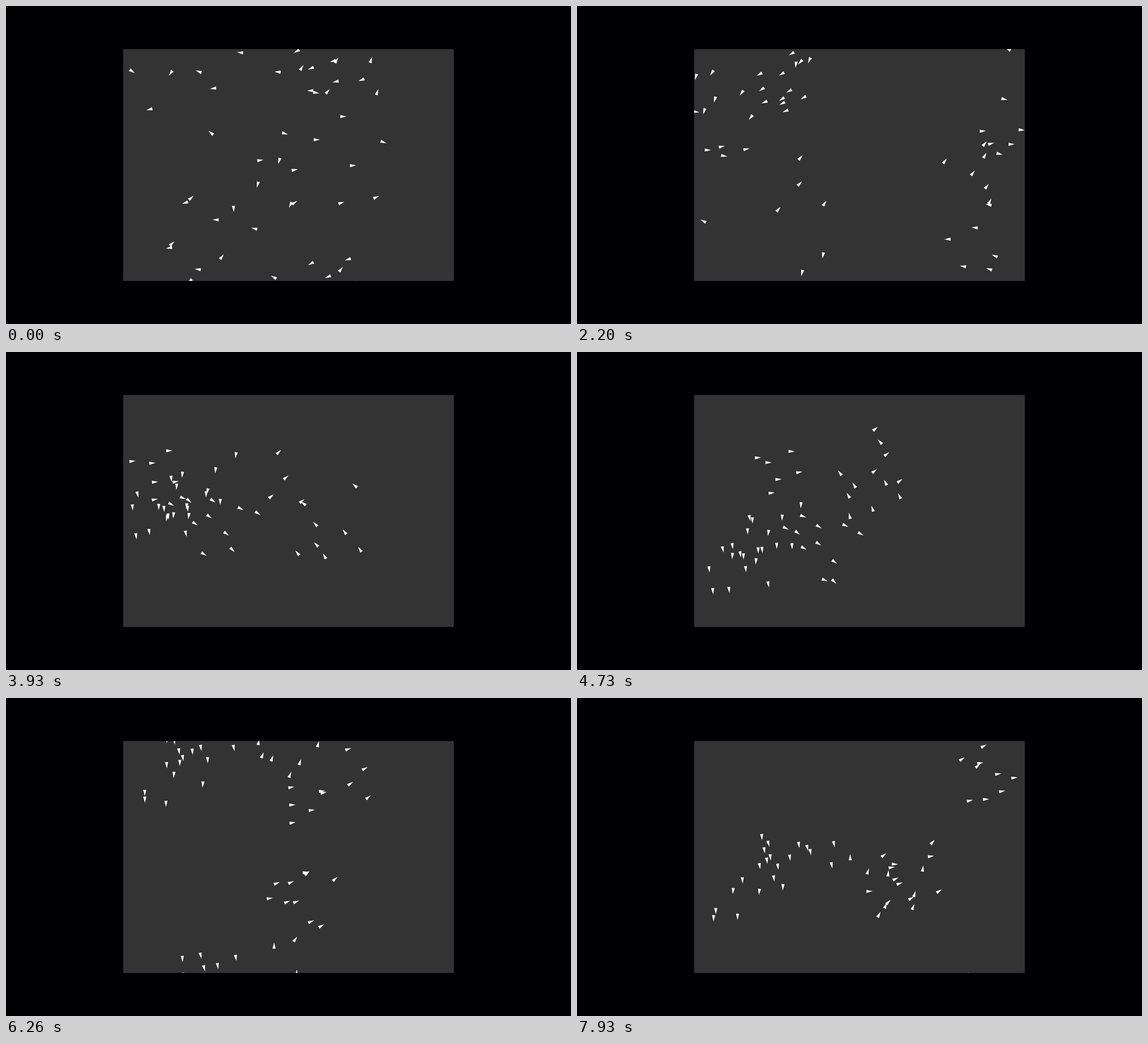
An HTML page with a canvas that plays this animation: 998x561 px, repeating every 8000 ms.

```html
<!DOCTYPE html>
<html lang="en">
<head>
<meta charset="utf-8">
<title>Flocking</title>
<style>
  html, body { margin: 0; width: 100%; height: 100%; overflow: hidden; background: #000003; }
  canvas { display: block; width: 998px; height: 561px; }
</style>
</head>
<body>
<canvas id="stage" width="998" height="561"></canvas>
<script>
const LOOP = 8000, FRAMES = 120;
const PANEL = { x: 207, y: 76, width: 584, height: 409 };
const R = 2.75;
const GOLDEN_ANGLE = 2.4;

// Each flock follows a smooth path through evenly timed points.
// Points may lie beyond the panel: boids wrap round its edges.
const flocks = [
  { count: 11, spread: 48, path: [[560, 95], [338, 165], [320, 400], [360, 717]] },
  { count: 4, spread: 45, path: [[455, 335], [397, 525], [367, 790], [420, 1135]] },
  { count: 6, spread: 60, path: [[310, 140], [255, 190], [288, 480], [280, 800]] },
  { count: 8, spread: 75, path: [[960, 440], [690, 402], [495, 168], [548, -100]] },
  { count: 6, spread: 50, path: [[600, 525], [745, 255], [1020, 205], [1344, 160]] },
  { count: 11, spread: 75, path: [[565, 265], [850, 240], [1080, 365], [1190, 325]] },
  { count: 4, spread: 60, path: [[315, 440], [430, 300], [600, 165], [735, 90]] }
];

const ctx = document.getElementById('stage').getContext('2d');

function seededRandom(seed) {
  return () => (seed = seed * 16807 % 2147483647) / 2147483647;
}

// Catmull-Rom spline through the points, for u from 0 to 1; ends run on straight.
function along(path, u, axis) {
  const last = path.length - 1;
  const i = Math.min(Math.floor(Math.max(u, 0) * last), last - 1);
  const s = u * last - i;
  const b = path[i][axis], c = path[i + 1][axis];
  const a = i > 0 ? path[i - 1][axis] : 2 * b - c;
  const d = i + 2 <= last ? path[i + 2][axis] : 2 * c - b;
  return b + s / 2 * (c - a + s * (2 * a - 5 * b + 4 * c - d + s * (3 * (b - c) + d - a)));
}

function makeBoids() {
  const random = seededRandom(2718);
  return flocks.flatMap(({ count, spread, path }) => {
    const turn = random() * 2 * Math.PI;
    return Array.from({ length: count }, (_, i) => ({
      path,
      radius: spread * Math.sqrt((i + 0.3 + 0.5 * random()) / count),
      angle: turn + i * GOLDEN_ANGLE,
      drift: random() - 0.5,
      phase: random() * 2 * Math.PI
    }));
  });
}

// A boid circles slowly about its flock, which starts loose and draws together.
function position({ path, radius, angle, drift, phase }, seconds) {
  const u = seconds * 1000 / LOOP;
  const r = radius * (1 + 0.7 * Math.exp(-seconds / 1.5) + 0.15 * Math.sin(seconds + phase));
  const a = angle + drift * seconds;
  return [along(path, u, 0) + r * Math.cos(a), along(path, u, 1) + r * Math.sin(a)];
}

function wrap(value, start, size) {
  const low = start - 2 * R, period = size + 4 * R;
  return low + ((value - low) % period + period) % period;
}

function drawBoid(boid, seconds) {
  const [x, y] = position(boid, seconds);
  const [nextX, nextY] = position(boid, seconds + 0.02);
  ctx.save();
  ctx.translate(wrap(x, PANEL.x, PANEL.width), wrap(y, PANEL.y, PANEL.height));
  ctx.rotate(Math.atan2(nextY - y, nextX - x));
  ctx.beginPath();
  ctx.moveTo(2 * R, 0);
  ctx.lineTo(-2 * R, -R);
  ctx.lineTo(-2 * R, R);
  ctx.fill();
  ctx.restore();
}

function draw(seconds) {
  const { x, y, width, height } = PANEL;
  ctx.clearRect(0, 0, 998, 561);
  ctx.save();
  ctx.beginPath();
  ctx.rect(x, y, width, height);
  ctx.clip();
  ctx.fillStyle = '#333';
  ctx.fillRect(x, y, width, height);
  ctx.fillStyle = '#fff';
  for (const boid of boids) drawBoid(boid, seconds);
  ctx.restore();
}

const boids = makeBoids();
const startTime = performance.now();

function tick() {
  const time = (performance.now() - startTime) % LOOP;
  // Frame changes fall on the 10 ms mark just before each 1/15 s.
  const frame = Math.floor((time + 6.7) * FRAMES / LOOP) % FRAMES;
  draw(frame * LOOP / FRAMES / 1000);
  requestAnimationFrame(tick);
}
tick();
</script>
</body>
</html>
```
